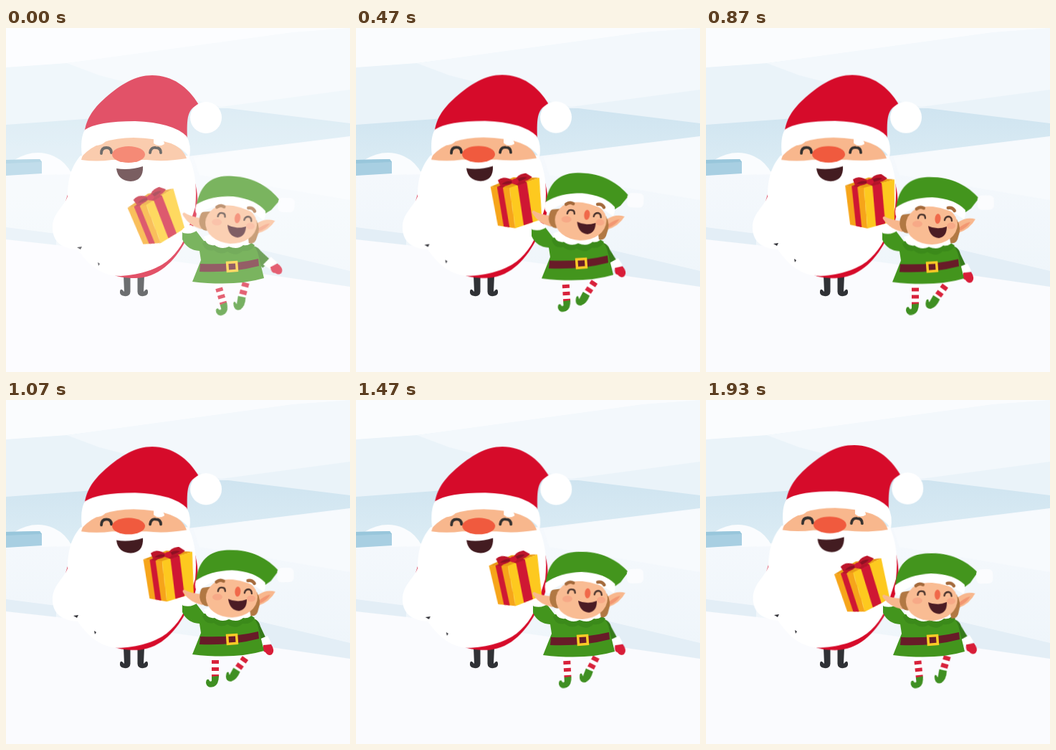
An HTML page for the animation above (1990 ms loop, 480 px wide and 480 px high).

```html
<!DOCTYPE html>
<html lang="en">
<head>
<meta charset="utf-8">
<title>Winter friends</title>
<style>
html, body { margin: 0; width: 100%; height: 100%; overflow: hidden; background: #f9fbfe; }
svg { display: block; width: 100vw; height: 100vh; }

/* Each stretch is held in steps of one fifteenth of a second. */
.move { animation: 1990ms linear infinite; }
#santa { animation-name: bob; transform-origin: 180px 349px; }
#gift { animation-name: gift; transform-origin: 232px 240px; }
#elf { animation-name: hop; }
#head { animation-name: nod; transform-origin: 316px 275px; }
#arm { animation-name: arm; transform-origin: 345px 312px; }
#legL { animation-name: legL; transform-origin: 292px 358px; }
#legR { animation-name: legR; transform-origin: 335px 360px; }
#specks { animation-name: specks; }
#streaks { animation-name: streaks; opacity: 0; }
#haze { animation-name: haze; opacity: 0; }

@keyframes bob {
  0% { transform: rotate(0deg) scaleY(1); animation-timing-function: steps(4) }
  13.568% { transform: rotate(0deg) scaleY(1.004); animation-timing-function: steps(6) }
  33.668% { transform: rotate(0deg) scaleY(1); animation-timing-function: steps(6) }
  53.769% { transform: rotate(0deg) scaleY(1.003); animation-timing-function: steps(4) }
  66.834% { transform: rotate(0deg) scaleY(1.007); animation-timing-function: steps(5) }
  83.92% { transform: rotate(.2deg) scaleY(.997); animation-timing-function: steps(4) }
  96.985% { transform: rotate(.6deg) scaleY(1.012); animation-timing-function: steps(1) }
  100% { transform: rotate(0deg) scaleY(1) }
}
@keyframes gift {
  0% { transform: translate(-22px, 22px) rotate(-18deg); animation-timing-function: steps(4) }
  13.568% { transform: translate(-14.5px, 2px) rotate(-11deg); animation-timing-function: steps(6) }
  33.668% { transform: translate(0, 0) rotate(0deg); animation-timing-function: steps(6) }
  53.769% { transform: translate(-4px, 3px) rotate(-4deg); animation-timing-function: steps(4) }
  66.834% { transform: translate(-7px, 7px) rotate(-7deg); animation-timing-function: steps(5) }
  83.92% { transform: translate(-11px, 12px) rotate(-10deg); animation-timing-function: steps(4) }
  96.985% { transform: translate(-13.5px, 17px) rotate(-14deg); animation-timing-function: steps(1) }
  100% { transform: translate(-22px, 22px) rotate(-18deg) }
}
@keyframes hop {
  0% { transform: translate(0, 0); animation-timing-function: steps(4) }
  13.568% { transform: translate(-2px, -9px); animation-timing-function: steps(6) }
  33.668% { transform: translate(0, 0); animation-timing-function: steps(6) }
  53.769% { transform: translate(0, 1px); animation-timing-function: steps(4) }
  66.834%, 83.92% { transform: translate(1px, 2px); animation-timing-function: steps(4) }
  96.985% { transform: translate(1px, 2px); animation-timing-function: steps(1) }
  100% { transform: translate(0, 0) }
}
@keyframes nod {
  0% { transform: translate(-1px, 0) rotate(3deg); animation-timing-function: steps(4) }
  13.568% { transform: translate(-1px, 0) rotate(3deg); animation-timing-function: steps(6) }
  33.668% { transform: translate(0, 0) rotate(0deg); animation-timing-function: steps(6) }
  53.769% { transform: translate(0, 1.5px) rotate(-1deg); animation-timing-function: steps(4) }
  66.834% { transform: translate(-1px, 2.5px) rotate(-1.5deg); animation-timing-function: steps(5) }
  83.92% { transform: translate(-1px, 3.5px) rotate(-2deg); animation-timing-function: steps(4) }
  96.985% { transform: translate(-1px, 5px) rotate(-3deg); animation-timing-function: steps(1) }
  100% { transform: translate(-1px, 0) rotate(3deg) }
}
@keyframes arm {
  0% { transform: rotate(-22deg); animation-timing-function: steps(4) }
  13.568% { transform: rotate(-13deg); animation-timing-function: steps(6) }
  33.668%, 53.769% { transform: rotate(0deg); animation-timing-function: steps(4) }
  66.834% { transform: rotate(-2deg); animation-timing-function: steps(5) }
  83.92% { transform: rotate(-4deg); animation-timing-function: steps(4) }
  96.985% { transform: rotate(-6deg); animation-timing-function: steps(1) }
  100% { transform: rotate(-22deg) }
}
@keyframes legL {
  0% { transform: translate(4px, 1px) rotate(-16deg); animation-timing-function: steps(4) }
  13.568% { transform: translate(3px, 1px) rotate(-7deg); animation-timing-function: steps(6) }
  33.668%, 53.769% { transform: translate(0, 0) rotate(0deg); animation-timing-function: steps(4) }
  66.834% { transform: translate(1px, 0) rotate(-2deg); animation-timing-function: steps(5) }
  83.92% { transform: translate(1px, 0) rotate(-5deg); animation-timing-function: steps(4) }
  96.985% { transform: translate(2px, 0) rotate(-6deg); animation-timing-function: steps(1) }
  100% { transform: translate(4px, 1px) rotate(-16deg) }
}
@keyframes legR {
  0% { transform: translate(1px, -4px) rotate(-22deg); animation-timing-function: steps(4) }
  13.568% { transform: translate(0, -1px) rotate(-7deg); animation-timing-function: steps(6) }
  33.668% { transform: translate(0, 0) rotate(0deg); animation-timing-function: steps(6) }
  53.769% { transform: translate(0, 0) rotate(-2deg); animation-timing-function: steps(4) }
  66.834% { transform: translate(0, -2px) rotate(-7deg); animation-timing-function: steps(5) }
  83.92% { transform: translate(1px, -3px) rotate(-15deg); animation-timing-function: steps(4) }
  96.985% { transform: translate(2px, -4px) rotate(-21deg); animation-timing-function: steps(1) }
  100% { transform: translate(1px, -4px) rotate(-22deg) }
}
@keyframes specks {
  0% { transform: translate(2px, 3px); animation-timing-function: steps(4) }
  13.568% { transform: translate(0, 1px); animation-timing-function: steps(6) }
  33.668%, 53.769% { transform: translate(-3px, -2px); animation-timing-function: steps(4) }
  66.834% { transform: translate(1px, 2px); animation-timing-function: steps(5) }
  83.92%, 100% { transform: translate(-2px, -3px) }
}
@keyframes streaks {
  0%, 63.5% { opacity: 0; animation-timing-function: step-end }
  66.8% { opacity: .6; animation-timing-function: step-end }
  70.3%, 100% { opacity: 0 }
}
@keyframes haze {
  0% { opacity: .29; animation-timing-function: steps(3) }
  10.05%, 96.985% { opacity: 0; animation-timing-function: step-end }
  100% { opacity: 0 }
}
</style>
</head>
<body>
<svg viewBox="0 0 480 480">
  <defs>
    <linearGradient id="ridge" x2="0" y2="1">
      <stop stop-color="#cfe4f0"/><stop offset="1" stop-color="#ddedf5"/>
    </linearGradient>
    <linearGradient id="slope" x2="0" y2="1">
      <stop stop-color="#f6f9fd"/><stop offset="1" stop-color="#eef5fa"/>
    </linearGradient>
  </defs>
  <g id="scene">
    <path fill="#fafcfe" d="M0 0H480V480H0Z"/>
    <path fill="#eaf3f9" d="M0 55 85 49 240 30 480 2V160H0Z"/>
    <path fill="#f3f8fc" d="M85 49 400 6 480 0V86L300 110 130 66Z"/>
    <path fill="url(#ridge)" d="M0 135 110 127 250 112 310 112 480 133V170L262 200 0 207Z"/>
    <path fill="url(#slope)" d="M0 205 90 200 262 178 480 151V370H0Z"/>
    <path fill="#f7fafd" d="M262 181 330 170 480 153V240L270 205Z"/>
    <path fill="#fafcfe" d="M12 184Q40 167 67 179 84 187 92 204L50 205V187Z"/>
    <path fill="#a8cfe2" d="M0 184 47 183 50 187V203L0 206Z"/>
    <path fill="#98c6db" d="M0 184 47 183 50 187 0 189Z"/>
    <path fill="#e3eef6" d="M0 278 70 287V304L0 297ZM345 307 480 339V362L350 343Z"/>
    <path fill="#fafbfe" d="M0 295 90 305 260 329 480 361V480H0Z"/>
  </g>

  <g fill="#303236">
    <path id="boot" d="M164 345H173.500V368Q173 375 165 374 158 373 159 367 160 363 163 366L165 368Z"/>
    <use href="#boot" transform="matrix(-1 0 0 1 357 0)"/>
  </g>

  <g id="santa" class="move">
    <path fill="#d60b2a" d="M258 200C273 232 270 270 250 298 235 326 212 349 180 349 164 349 152 347 145 341L82 245 90 220Z"/>
    <path fill="#fff" d="M104 178C94 190 86 205 86 235 80 251 63 260 65 282 67 302 83 308 100 309 115 330 132 346 160 346 190 344 210 336 224 326 240 313 251 296 257 272L264 250C267 220 263 195 254 178Z"/>
    <path fill="#f8b78d" d="M105 184C110 164 132 151 172 151 218 151 246 162 252 182Q222 187 196 184H148Q126 187 105 184Z"/>
    <path fill="#fff" d="M125 160Q129 153 140 154 139 163 125 164ZM206 153Q221 154 221 162 213 167 206 161Z"/>
    <path fill="#d60b2a" d="M109 150C111 128 120 114 139 97 160 79 180 66 204 66 232 66 254 82 269 107 253 112 252 126 253 154Z"/>
    <path fill="#fff" d="M110 142Q128 130 180 130 233 132 252 151 259 163 256 181 240 154 178 153 130 153 106 179 103 154 110 142Z"/>
    <circle cx="279" cy="125" r="22" fill="#fff"/>
    <path d="M133 175Q133 167 140 167 147 167 147 174M201 174Q202 166 209 167 216 167 216 174" fill="none" stroke="#34312f" stroke-width="3.800" stroke-linecap="round"/>
    <ellipse cx="171" cy="176.500" rx="23" ry="11.500" fill="#f05a3e"/>
    <path fill="#431c21" d="M154 196Q172 199 191 193 192 213 174 214 156 213 154 196Z"/>
  </g>

  <g id="specks" class="move" fill="#34343a">
    <path d="M97 303 104 302 102 306ZM126 324 129 326 127 329Z"/>
  </g>

  <g id="gift" class="move">
    <path fill="#e99a16" d="M197 217 230 207 266 211 223 222Z"/>
    <path fill="#f6a51a" d="M197 217 223 221 226 278 202 272Z"/>
    <path fill="#fdc91f" d="M223 221 266 211 264 269 226 278Z"/>
    <path fill="#cf1733" d="M206 218 214 219.500 218 276 210 274Z"/>
    <path fill="#cf1733" d="M235 218.500 248 215.500 251 272 238 275Z"/>
    <path fill="#b41429" d="M206 218 241 209 248 216 235 219 225 214 214 220Z"/>
    <path fill="#bd152b" d="M231 213Q218 202 208 209L211 218Q224 219 231 213ZM231 213Q236 202 248 203L256 209Q247 217 231 213Z"/>
    <path fill="#8e1023" d="M231 213Q220 209 213 215 224 217 231 213ZM231 213Q239 206 249 209 243 214 231 213Z"/>
    <ellipse cx="232" cy="213" rx="5" ry="4" fill="#cf1733"/>
  </g>

  <g id="elf" class="move">
    <g id="legL" class="move">
      <path d="M292 350V386" stroke="#fff" stroke-width="10"/>
      <path d="M292 362V386" stroke="#d8223b" stroke-width="10" stroke-dasharray="5 5"/>
      <path fill="#3f8f22" d="M287 385 297 384Q297 396 290 399 281 402 279 394 279 388 283 389 284 393 287 391Z"/>
    </g>
    <g id="legR" class="move">
      <path d="M338 353 322 375" stroke="#fff" stroke-width="10"/>
      <path d="M334 359 322 375" stroke="#d8223b" stroke-width="10" stroke-dasharray="6 5"/>
      <path fill="#3f8f22" d="M317 372 326 378Q321 389 313 391 306 391 306 384 307 376 310 378L311 382Z"/>
    </g>
    <g id="arm" class="move">
      <path fill="#357a1a" d="M337 303Q352 302 355 315L363 332 349 338 339 322Z"/>
      <path fill="#fff" d="M351 334 365 328 370 338 358 344Z"/>
      <path fill="#d81d38" d="M359 341 370 340Q376 349 371 354 366 357 362 351 357 350 359 341Z"/>
    </g>
    <path fill="#43951d" d="M246 283Q256 284 263 280L276 297 340 299Q350 304 353 320L360 349Q320 361 260 354L272 324 270 311Q253 310 246 295Z"/>
    <path fill="#fff" d="M245 283Q250 275 258 275L268 281Q260 289 247 286Z"/>
    <path fill="#3b8a1a" d="M274 300Q278 313 290 310 300 318 309 312 322 320 330 311 342 313 347 303L338 297H280Z"/>
    <path fill="#fff" d="M276 291Q279 305 291 303 301 310 311 305 323 310 331 303 341 305 345 295L330 287H288Z"/>
    <path fill="#681c28" d="M271 329Q315 331 352 322L353 332Q315 342 270 340Z"/>
    <rect x="309" y="327" width="13" height="12" fill="#681c28" stroke="#ffcb27" stroke-width="3.500" transform="rotate(-4 315 333)"/>

    <g id="head" class="move">
      <path fill="#f8b78d" d="M274 268Q257 266 249 261 245 262 248 266 257 279 274 283ZM352 270Q364 262 376 266 368 280 352 285Z"/>
      <path fill="#f29772" d="M354 277Q364 270 369 270 364 278 354 282Z"/>
      <path fill="#b17843" d="M273 259Q267 273 274 282 282 288 286 281L290 257ZM350 266Q357 278 352 290 350 301 341 299L337 270Z"/>
      <ellipse cx="315" cy="273" rx="36" ry="28" fill="#f9bc93"/>
      <g fill="#f58f76" opacity=".4"><ellipse cx="295" cy="272" rx="7" ry="4.500"/><ellipse cx="342" cy="275" rx="6" ry="4.500"/></g>
      <path fill="#43951d" d="M265 256C267 224 281 209 306 207 341 205 366 219 381 237L370 251 361 257Q316 224 265 256Z"/>
      <rect x="379" y="233" width="23" height="20" rx="6" fill="#fbfcfe"/>
      <path fill="#fff" d="M265 249Q285 235 316 235 347 237 362 253 363 260 360 266 341 251 317 248 286 246 269 264 262 261 265 249Z"/>
      <path d="M294 251Q299 247 304 250M338 250Q344 249 347 254" fill="none" stroke="#a46a3c" stroke-width="4.500" stroke-linecap="round"/>
      <path d="M296 264Q297 258 302 259 306 259 306 264M333 267Q334 262 339 262 343 263 343 268" fill="none" stroke="#4b352e" stroke-width="2.400" stroke-linecap="round"/>
      <ellipse cx="323.500" cy="265" rx="4" ry="7" fill="#f0694a" transform="rotate(5 323.500 265)"/>
      <path fill="#4b1c24" d="M310 275Q322 281 336 276 336 290 325 292 312 291 310 275Z"/>
    </g>
  </g>

  <g id="streaks" class="move" stroke="#fff" stroke-width="4" stroke-linecap="round">
    <path d="M169 79 186 71M150 126 177 115M204 248 216 243M227 242 239 238"/>
  </g>
  <rect id="haze" class="move" width="480" height="480" fill="#fff"/>
</svg>
</body>
</html>
```
